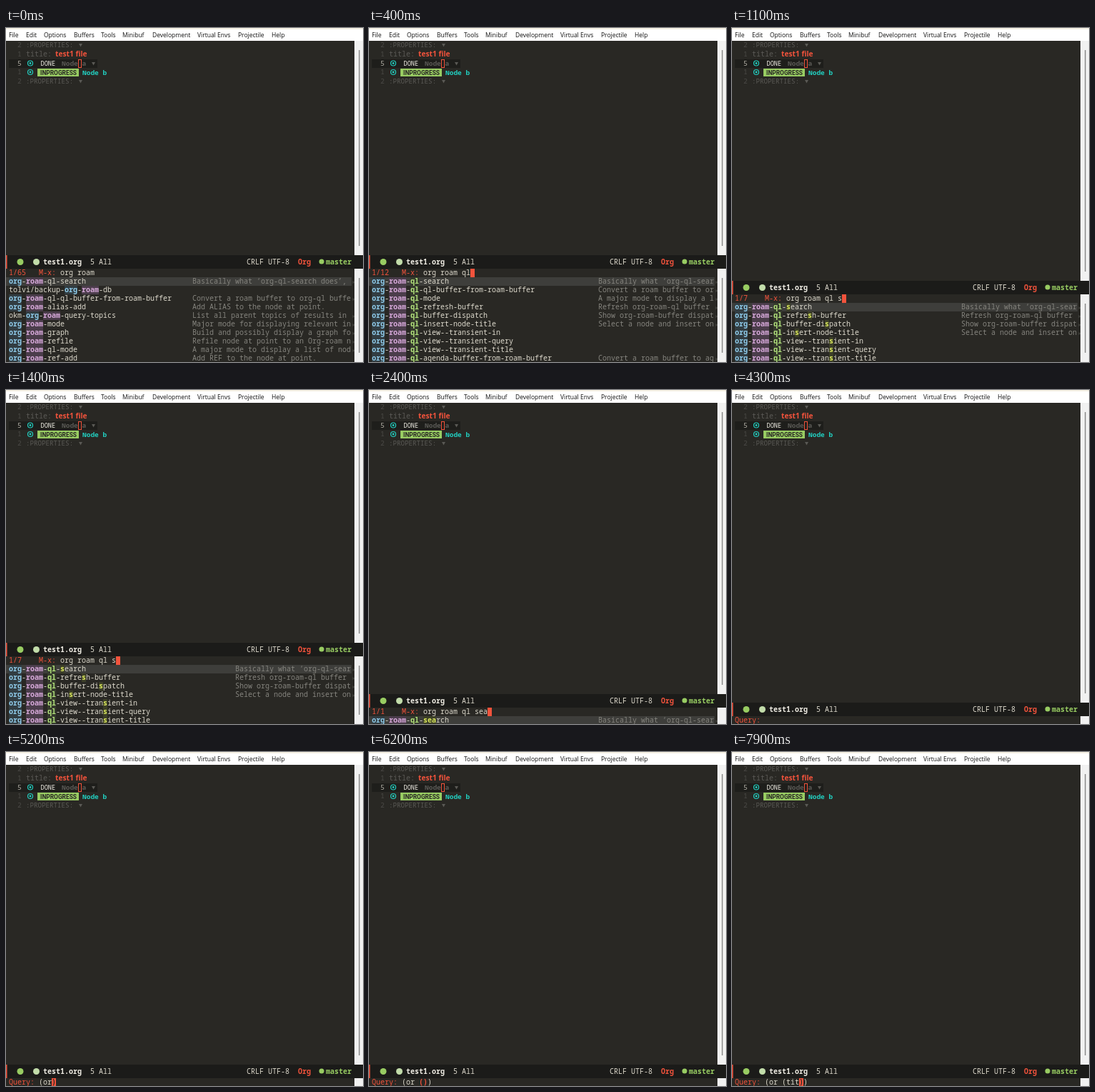
Write an HTML page with a canvas that moves like this. It is 500x469 px and loops after 8000 ms.

```html
<!DOCTYPE html>
<html lang="en">
<head>
<meta charset="utf-8">
<title>Org roam search</title>
<style>
html, body { margin: 0; width: 100%; height: 100%; overflow: hidden; background: #292824; }
canvas { display: block; }
</style>
</head>
<body>
<canvas id="stage" width="500" height="469"></canvas>
<script>
const ctx = document.getElementById('stage').getContext('2d');
const MONO = '"Noto Sans Mono", "DejaVu Sans Mono", monospace';
const SANS = '"Open Sans", sans-serif';
const LOOP = 8000, CHAR = 6, ROW = 12, LEFT = 4, BASE = 9;
const RED = '#f2533c', GREEN = '#98cc62', TEAL = '#22cfc0', DIM = '#5b5a56', TEXT = '#dedacd', BG = '#292824';

// Command name, description
const search = ['org-roam-ql-search', 'Basically what ‘org-ql-search does’, but'];
const convert = ['org-roam-ql-ql-buffer-from-roam-buffer', 'Convert a roam buffer to org-ql buffer'];
const mode = ['org-roam-ql-mode', 'A major mode to display a list of nodes'];
const refresh = ['org-roam-ql-refresh-buffer', 'Refresh org-roam-ql buffer with'];
const dispatch = ['org-roam-ql-buffer-dispatch', 'Show org-roam-buffer dispatch'];
const insert = ['org-roam-ql-insert-node-title', 'Select a node and insert only'];
const views = ['in', 'query', 'title'].map(v => ['org-roam-ql-view--transient-' + v, '']);

const lists = {
  roam: { count: '1/65', col: 261, rows: [
    search,
    ['tolvi/backup-org-roam-db', ''],
    convert,
    ['org-roam-alias-add', 'Add ALIAS to the node at point.'],
    ['okm-org-roam-query-topics', 'List all parent topics of results in a'],
    ['org-roam-mode', 'Major mode for displaying relevant in'],
    ['org-roam-graph', 'Build and possibly display a graph for'],
    ['org-roam-refile', 'Refile node at point to an Org-roam node'],
    mode,
    ['org-roam-ref-add', 'Add REF to the node at point.']] },
  ql: { count: '1/12', col: 321, rows: [
    search, convert, mode, refresh, dispatch, insert, ...views,
    ['org-roam-ql-agenda-buffer-from-roam-buffer', 'Convert a roam buffer to agenda']] },
  s: { count: '1/7', col: 321, rows: [search, refresh, dispatch, insert, ...views] },
  se: { count: '1/2', col: 321, rows: [search, insert] },
  sea: { count: '1/1', col: 321, rows: [search] }
};

// Start time, input, list name (or none for the query), cursor column
const steps = [
  [-500, 'org roam ', 'roam', 9],
  [200, 'org roam q', 'roam', 10],
  [300, 'org roam ql', 'ql', 11],
  [800, 'org roam ql ', 'ql', 12],
  [1000, 'org roam ql s', 's', 13],
  [1700, 'org roam ql se', 'se', 14],
  [2200, 'org roam ql sea', 'sea', 15],
  [2780, '', '', 0],
  [4600, '()', '', 1],
  [4900, '(o)', '', 2],
  [5100, '(or)', '', 3],
  [5350, '(or )', '', 4],
  [5650, '(or ())', '', 5],
  [6700, '(or (t))', '', 6],
  [7250, '(or (ti))', '', 7],
  [7700, '(or (tit))', '', 8]
];

// Foreground and background of each matched word
const matchColors = [
  ['#8fcbea', '#323d42'], ['#d7a9da', '#4b3d4b'], ['#b3e37c', '#363b2d'], ['#d9e65c', '#3c3f28']
];

function rect(x, y, w, h, color) {
  ctx.fillStyle = color;
  ctx.fillRect(x, y, w, h);
}

function disc(x, y, r, color) {
  ctx.fillStyle = color;
  ctx.beginPath();
  ctx.arc(x, y, r, 0, 7);
  ctx.fill();
}

function text(s, x, y, color, bold = false, size = 10, family = MONO) {
  ctx.font = `${bold ? 'bold ' : ''}${size}px ${family}`;
  ctx.fillStyle = color;
  ctx.fillText(s, x, y);
}

// Monospaced text placed on the character grid
const grid = (s, x, y, color, bold) => [...s].forEach((c, i) => text(c, x + i * CHAR, y, color, bold));

function fold(x, y) {
  ctx.fillStyle = DIM;
  ctx.beginPath();
  ctx.moveTo(x, y - 2);
  ctx.lineTo(x + 5, y - 2);
  ctx.lineTo(x + 2.5, y + 2.5);
  ctx.fill();
}

function bullet(x, y) {
  ctx.strokeStyle = TEAL;
  ctx.lineWidth = 1.2;
  ctx.beginPath();
  ctx.arc(x, y, 3.5, 0, 7);
  ctx.stroke();
  disc(x, y, 1.4, TEAL);
}

function drawMenu() {
  rect(0, 0, 500, 18, '#ffffff');
  rect(0, 0, 500, 2, '#f5f0e4');
  const items = { File: 4, Edit: 28, Options: 53, Buffers: 95, Tools: 133, Minibuf: 163,
    Development: 205, 'Virtual Envs': 268, Projectile: 325, Help: 372 };
  for (const name in items) text(name, items[name], 13, '#111', false, 8.5, SANS);
}

function drawEditor() {
  rect(4, 44, 124, 12, '#1e1e1b');
  ['2', '1', '5', '1', '2'].forEach((n, i) =>
    text(n, 16, Math.round(27 + i * 12.8), i == 2 ? '#b5b2a8' : '#4c4b47', false, 9.5));
  text(':PROPERTIES:', 28, 27, DIM, false, 9.2);
  fold(102, 24);
  text('title:', 28, 40, DIM);
  text('test1 file', 69, 40, RED, true, 10.2, SANS);

  bullet(34, 49.5);
  text('DONE', 48.5, 53, '#f0ede4', false, 8.6);
  text('Node a', 78, 53, DIM, true, 9.5);
  fold(120, 50);
  ctx.strokeStyle = RED;
  ctx.lineWidth = 1;
  ctx.strokeRect(101.5, 44.5, 4, 11);

  bullet(34, 62);
  rect(44, 57, 58, 11, GREEN);
  text('INPROGRESS', 48, 66, BG, true, 8.4, 'Roboto, sans-serif');
  text('Node b', 107, 66, TEAL, true, 9.5);
  text(':PROPERTIES:', 28, 78, DIM, false, 9.2);
  fold(102, 75);
}

function drawModeLine(y) {
  rect(0, y, 500, 19, '#1b1b19');
  rect(0, y, 1.5, 19, RED);
  disc(20, y + 9.5, 4.5, GREEN);
  disc(42.5, y + 9.5, 4.5, '#c2dcaa');
  grid('test1.org', 52, y + 13, '#f0ede4', true);
  grid('5 All', 118, y + 13, TEXT);
  grid('CRLF UTF-8', 337, y + 13, TEXT);
  grid('Org', 409, y + 13, RED, true);
  disc(442, y + 9, 3.5, GREEN);
  grid('master', 448, y + 13, GREEN, true);
}

function drawScrollBar(top, bottom, end) {
  rect(488, top, 12, bottom - top, '#f1f1f1');
  if (end > top + 20) rect(494, top + 13, 1.5, end - top - 13, '#8c8c8c');
}

function drawCandidate([name, info], y, words, col, selected) {
  if (selected) rect(0, y, 484, ROW, '#3e3e3b');
  grid(name, LEFT, y + BASE, TEXT);
  words.forEach((word, i) => {
    const at = name.indexOf(word), x = LEFT + at * CHAR;
    if (at < 0) return;
    rect(x, y, word.length * CHAR, ROW, matchColors[i][1]);
    grid(word, x, y + BASE, matchColors[i][0], true);
  });
  const room = Math.floor((484 - col) / CHAR);
  grid(info.slice(0, room), col, y + BASE, '#85847e');
  if (info.length >= room) text('»', 484.5, y + BASE, '#5f5e5a', false, 7);
}

function drawInput(input, cursor, x, y, lit) {
  const paired = input[cursor - 1] == '(' && input[cursor] == ')';
  [...input].forEach((c, i) => {
    const hot = paired && (i == cursor || i == cursor - 1);
    grid(c, x + i * CHAR, y + BASE, hot ? RED : TEXT, hot);
  });
  if (!lit) return;
  rect(x + cursor * CHAR, y, CHAR, ROW, RED);
  grid(input[cursor] || '', x + cursor * CHAR, y + BASE, BG, true);
}

function draw(now) {
  const t = now % LOOP;
  const [start, input, key, cursor] = steps.findLast(s => s[0] <= t);
  const list = lists[key];
  const rows = list ? list.rows : [];
  const top = 470 - ROW * (rows.length + 1);
  const lit = Math.floor((t - start) / 500) % 2 == 0;

  rect(0, 0, 500, 469, BG);
  drawMenu();
  drawEditor();
  drawScrollBar(18, top - 19, top - 32);
  drawScrollBar(top, 469, 456);
  drawModeLine(top - 19);

  if (list) {
    grid(list.count, LEFT, top + BASE, RED);
    grid('M-x:', 46, top + BASE, RED);
    drawInput(input, cursor, 76, top, lit);
    const words = input.trim().split(' ');
    rows.forEach((row, i) => drawCandidate(row, top + ROW * (i + 1), words, list.col, i == 0));
  } else {
    grid('Query:', LEFT, top + BASE, RED);
    drawInput(input, cursor, 46, top, lit);
  }
}

const begin = performance.now();
function tick() {
  draw(performance.now() - begin);
  requestAnimationFrame(tick);
}
tick();
</script>
</body>
</html>
```
